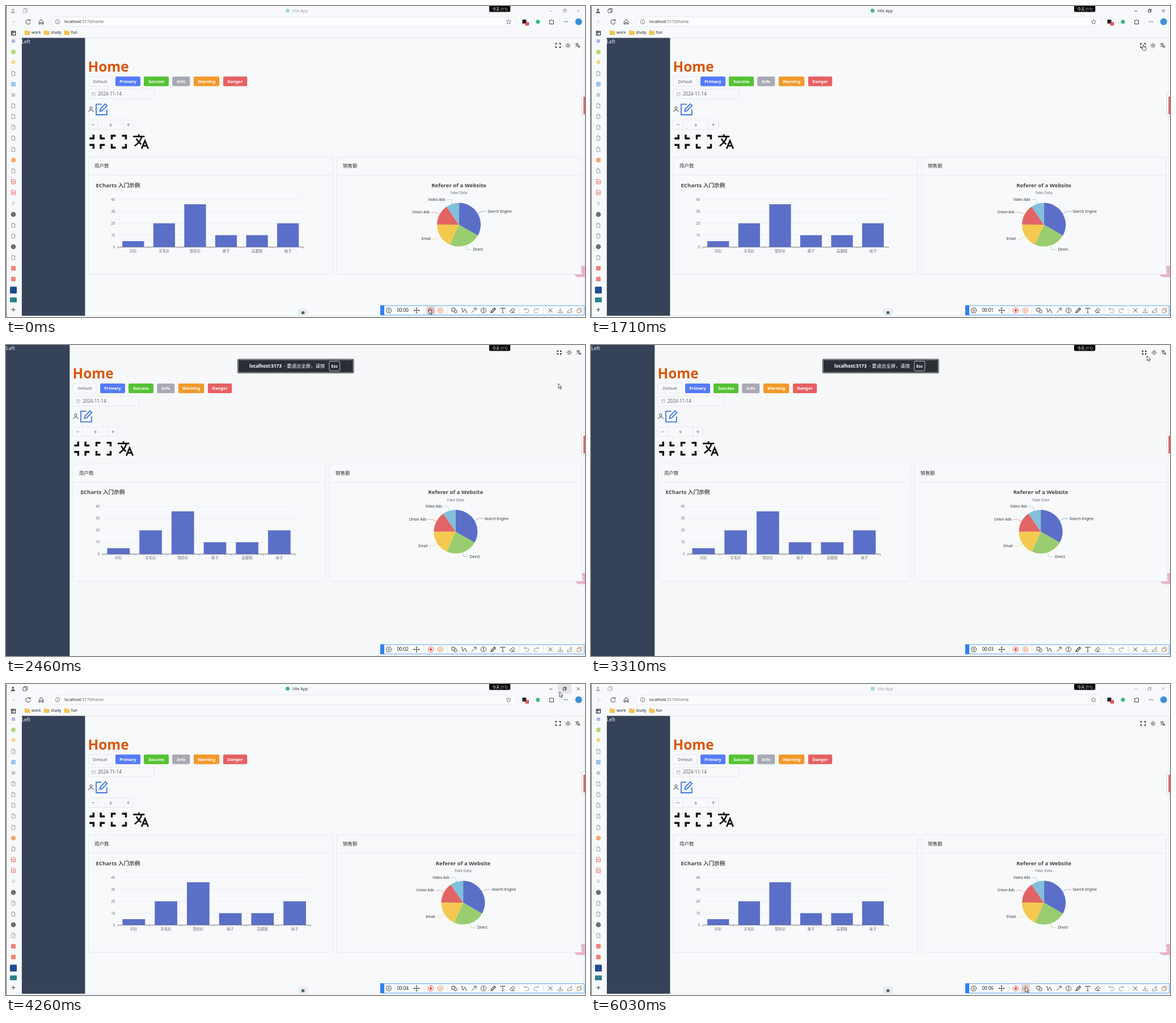
An HTML page that plays this animation: 1021 px wide and 549 px high, repeating every 6.13 s.

```html
<!DOCTYPE html>
<html lang="zh-CN">
<head>
<meta charset="utf-8">
<title>Vite App</title>
<style>
html, body { margin: 0; width: 100%; height: 100%; overflow: hidden; background: #f7f9fb; }
svg { display: block; width: 1021px; height: 549px; font-family: "Noto Sans", "Open Sans", "Noto Sans CJK SC", "Noto Sans CJK", sans-serif; }
text { white-space: pre; }
</style>
</head>
<body>
<svg id="stage" viewBox="0 0 1021 549"></svg>
<script>
const LOOP = 6130;
const $ = id => document.getElementById(id);

// Markup helpers
const rect = (x, y, w, h, fill, more = '') => `<rect x="${x}" y="${y}" width="${w}" height="${h}" fill="${fill}" ${more}/>`;
const circle = (x, y, r, fill, more = '') => `<circle cx="${x}" cy="${y}" r="${r}" fill="${fill}" ${more}/>`;
const line = (d, color, w = 0.8, more = '') => `<path d="${d}" fill="none" stroke="${color}" stroke-width="${w}" ${more}/>`;
const text = (x, y, size, str, fill, more = '') => `<text x="${x}" y="${y}" font-size="${size}" fill="${fill}" ${more}>${str}</text>`;
const at = (x, y, body, s = 1) => `<g transform="translate(${x} ${y}) scale(${s})">${body}</g>`;
const group = (id, body) => `<g id="${id}">${body}</g>`;
const MID = 'text-anchor="middle"', END = 'text-anchor="end"', BOLD = 'font-weight="700"', SEMI = 'font-weight="600"';

// Icons centred on the origin
const EXPAND = 'M-12.5 -4V-10.5H-5.5M5.5 -10.5H12.5V-4M12.5 4V10.5H5.5M-5.5 10.5H-12.5V4';
const SHRINK = 'M-13.5 -5.7H-6.4V-12.5M6.4 -12.5V-5.7H13.5M13.5 5.7H6.4V12.5M-6.4 12.5V5.7H-13.5';
const LANG = 'M-11 -7H5M-3 -10V-7M1.2 -7C0 -2 -4 3 -8.8 6.3M-6.3 -4C-5 -1 -2 2 .5 4M.9 10L5.5 -1.1 10.1 10M2.7 6H8.4';
const SUN = circle(0, 0, 2, 'none', 'stroke="#222" stroke-width=".9"') +
  [...Array(8)].map((_, i) => `<path d="M0 -3.3V-4.7" stroke="#222" stroke-width=".9" transform="rotate(${i * 45})"/>`).join('');
const DOC = line('M-2.8 -3.8H.8L2.8 -1.8V3.8H-2.8ZM.8 -3.8V-1.8H2.8', '#777', 0.7);

function sideRail() {
  const dot = (y, c, r = 4) => circle(13, y, r, c);
  const box = (y, c, s = 8) => rect(13 - s / 2, y - s / 2, s, s, c, 'rx="1"');
  const docs = [119, 176, 195, 214, 233, 253, 291, 387, 406, 444].map(y => at(13, y, DOC)).join('');
  return docs + line('M9.5 44.5H16.5V51.5H9.5ZM9.5 46.5H16.5M12 44.5V51.5', '#222', 1.1) +
    box(62, '#a9b4f0', 6) + dot(81, '#b9d67c') + dot(99, '#f3d98a', 3.5) + box(138, '#9cc6ee') +
    dot(157, '#c9c9c9', 3.5) + dot(272, '#f2ab70', 4.3) +
    [310, 329].map(y => at(13, y, line('M-3.5 -4H2L3.5 -2.5V4H-3.5ZM-3.5 -.5H3.5M-2 1.8H2', '#e46a62', 0.9))).join('') +
    line('M10.5 346H15.5M10.5 348.2H15.5M10.5 350.4H15.5', '#aaa') +
    dot(368, '#6b6f75', 4.4) + dot(425, '#6b6f75', 4.4) + box(463, '#ee8478') + box(482, '#ee8478') +
    box(501.5, '#1f4b8f', 12) + rect(7, 514.5, 12, 8.5, '#2a8288') + line('M9.5 536H16.5M13 532.5V539.5', '#222', 0.9);
}

function chrome() {
  const folder = (x, name) => `<path d="M${x} 43.5H${x + 3.3}L${x + 4.4} 44.7H${x + 8.6}V50.4H${x}Z" fill="#f6c644" stroke="#d9a12a" stroke-width=".5"/>` +
    text(x + 11.8, 49.2, 7, name, '#222');
  const title = circle(12.3, 6.8, 2, '#8a5a48') + '<path d="M8.5 12.4C8.7 8.6 15.9 8.6 16.1 12.4Z" fill="#4a4a52"/>' +
    line('M30 6H35.5V12H30ZM32 6V4.5H37.5V10.5H35.5', '#333') + circle(496.5, 8.3, 3.5, '#41b883') +
    text(505, 11, 7, 'Vite App', '#333') +
    line('M958 9H963.5M982.5 7H986.5V11H982.5ZM984 7V5.6H988V9.6H986.5M1006.7 6L1011.7 11M1011.7 6L1006.7 11', '#222');
  return rect(0, 0, 1021, 549, '#f7f9fc') +
    rect(27.5, 56, 991.7, 491, '#f7f9fb', 'stroke="#dfe4e8" stroke-width=".7" rx="2"') +
    `<rect id="maxHover" x="973" y="0" width="24" height="17" fill="#e2e4e7"/>` + group('title', title) +
    line('M19 28H11.5M14.7 24.8L11.5 28L14.7 31.2', '#c9ccd0') +
    line('M42.2 25.6A4 4 0 1 0 43 28.6M42.7 23.6V26H40.2', '#222', 0.9) +
    line('M58.3 27.3L62 24L65.7 27.3V32H63.5V29H60.5V32H58.3Z', '#222', 0.9) +
    rect(78, 19.2, 822, 17, '#fbfcfd', 'rx="8.5" stroke="#e1e5e9" stroke-width=".8"') +
    circle(91, 27.8, 3.9, 'none', 'stroke="#555" stroke-width=".7"') + line('M91 27V30M91 25.3V26.1', '#555') +
    text(103, 30.4, 7, 'localhost<tspan fill="#666">:5173/home</tspan>', '#222') +
    line('M886.3 23.7L887.5 26.4 890.4 26.7 888.2 28.7 888.9 31.6 886.3 30.1 883.7 31.6 884.4 28.7 882.2 26.7 885.1 26.4Z', '#555', 0.7) +
    rect(910.5, 24, 7, 7, '#20242a', 'rx="1"') + rect(915.7, 28.2, 6.3, 6.3, '#d9363e', 'rx="1"') + text(918.9, 33.4, 5, '2', '#fff', MID) +
    circle(938, 27.8, 3.6, '#41b883') +
    line('M958.5 25.5H960.5A1.6 1.6 0 0 1 963.5 25.5H965.5V31.8H958.5V30A1.5 1.5 0 0 0 958.5 27.2Z', '#222', 0.9) +
    line('M976.5 23V32.5', '#dde1e5') + [984.5, 987.3, 990.1].map(x => circle(x, 27.8, 0.75, '#222')).join('') +
    circle(1009.8, 27.8, 6, '#3b8fd8') +
    folder(33.3, 'work') + folder(67.5, 'study') + folder(103, 'fun') + sideRail() +
    rect(515, 533.5, 17.5, 13.5, '#e9ebee', 'rx="6"') + circle(523.7, 541.5, 2.8, '#4a6a66');
}

function form() {
  const button = (x, w, name, fill, ink = '#fff', more = SEMI) => rect(x, 124.5, w, 17, fill, `rx="2" ${ink === '#fff' ? '' : 'stroke="#dcdfe6" stroke-width=".6"'}`) +
    text(x + w / 2, 135.8, 7.4, name, ink, `${MID} ${more}`);
  const FIELD = 'rx="2" stroke="#dfe2e8" stroke-width=".7"';
  return text(27.5, 65.6, 8.5, 'Left', '#f0f2f5') + text(144.5, 115.6, 24.4, 'Home', '#d9570b', BOLD) +
    button(145, 42, 'Default', '#f8f9fb', '#606266', '') + button(193, 44, 'Primary', '#557bfa') +
    button(243, 44, 'Success', '#55c234') + button(293.3, 31, 'Info', '#a7aab3') +
    button(331, 45.3, 'Warning', '#f3992a') + button(383, 42.3, 'Danger', '#e56062') +
    rect(145, 147.2, 116.5, 16.6, '#f8f9fb', FIELD) +
    line('M151.3 153H157V158.5H151.3ZM151.3 155H157M152.8 152V153.5M155.6 152V153.5', '#a9adb5', 0.7) +
    text(162, 158.3, 8, '2024-11-14', '#606266') +
    circle(149.9, 180, 2.1, 'none', 'stroke="#333" stroke-width=".9"') + line('M146.1 187V185.7A2.6 2.6 0 0 1 148.7 183.6H151.1A2.6 2.6 0 0 1 153.7 185.7V187', '#333', 0.9) +
    line('M168.5 173.3H159V192H177.8V182.5M165.5 186L166.3 181.8L175.2 172.7L178.3 175.8L169.5 184.9Z', '#3f76dc', 1.8) +
    rect(145, 201.2, 79.8, 16.6, '#f8f9fb', FIELD) + line('M162 201.5V217.5M207.4 201.5V217.5', '#dfe2e8', 0.7) +
    line('M150.6 209.6H156.2M212.8 209.6H218.4M215.6 206.8V212.4', '#666', 0.7) + text(184.5, 212.5, 7.6, '9', '#606266', MID) +
    at(160.7, 239.5, line(SHRINK, '#111', 3.4)) + at(199, 239.5, line(EXPAND, '#111', 3.4)) + at(238, 239.2, line(LANG, '#111', 2.1), 1.27);
}

function pie() {
  const slices = [['Search Engine', 1048, '#5b6fc8'], ['Direct', 735, '#9acc70'], ['Email', 580, '#f3c950'], ['Union Ads', 484, '#e26465'], ['Video Ads', 300, '#82bfdc']];
  const R = 38.5;
  const polar = (a, r) => [r * Math.sin(a), -r * Math.cos(a)];
  let from = 0;
  return text(0, -66.4, 9.6, 'Referer of a Website', '#464646', `${MID} ${BOLD}`) + text(0, -54, 6.4, 'Fake Data', '#6e7079', MID) +
    slices.map(([name, value, color]) => {
      const to = from + value / 3147 * Math.PI * 2, mid = (from + to) / 2;
      const [x, y] = polar(mid, R + 8), side = x > 0 ? 1 : -1;
      const out = `<path d="M0 0L${polar(from, R)}A${R} ${R} 0 0 1 ${polar(to, R)}Z" fill="${color}"/>` +
        line(`M${polar(mid, R)}L${x} ${y}h${side * 8}`, color, 0.6) +
        text(x + side * 10.4, y + 2.2, 6.4, name, '#333', side < 0 ? END : '');
      from = to;
      return out;
    }).join('');
}

// k = 0 narrow layout, 1 wide layout
function bars(k) {
  const left = 197, right = 524.5 + 13 * k, step = (right - left) / 6, base = 425.6;
  let out = '';
  for (let v = 0; v <= 40; v += 10) {
    const y = base - v * 2.1;
    out += text(192.5, y + 2.2, 6.4, v, '#6e7079', END) + line(`M${left} ${y}H${right}`, v ? '#e2e7f0' : '#6e7079', 0.6);
  }
  const data = [['衬衫', 5], ['羊毛衫', 20], ['雪纺衫', 36], ['裤子', 10], ['高跟鞋', 10], ['袜子', 20]];
  data.forEach(([name, v], i) => {
    const x = left + i * step;
    out += rect(x + step * 0.15, base - v * 2.1, step * 0.7, v * 2.1, '#5b6fc8') +
      line(`M${x} ${base}v2.6`, '#6e7079', 0.6) + text(x + step / 2, 434.6, 6.4, name, '#6e7079', MID);
  });
  return out + line(`M${right} ${base}v2.6M${left} ${base}H${right}`, '#6e7079', 0.6);
}

function card(id, x, name) {
  const box = `x="${x}" y="266.3" width="431" height="207.2" rx="2"`;
  return `<rect id="${id}Glow" ${box} fill="none" stroke="#8d96a3" stroke-width="2.4"/>` +
    `<rect id="${id}Box" ${box} fill="#f7f9fb" stroke="#e4e7ec" stroke-width=".8"/>` +
    `<path id="${id}Rule" stroke="#e4e7ec" stroke-width=".8"/>` + text(x + 11, 285.3, 8.5, name, '#303133');
}

function tooltip() {
  return rect(778.6, 354.5, 81, 31.3, '#f8f8fc', 'rx="2" fill-opacity=".87" stroke="#e26465" stroke-width=".7"') +
    text(784, 366.4, 7.5, 'Access From', '#666') + circle(786.8, 376.6, 2.7, '#e26465') +
    text(792.3, 379.3, 7.5, 'Union Ads', '#666') + text(854, 379.3, 7.5, '484', '#666', `${END} ${BOLD}`);
}

function recorder() {
  const ink = '#333', ic = (x, d, c = ink, w = 0.9) => at(x, 537.4, line(d, c, w));
  return rect(660.3, 529, 359.2, 16.4, '#fcfdfe', 'stroke="#4b9bf5" stroke-width=".9"') + rect(660, 528.6, 7, 17.2, '#2f80f5', 'rx="1"') +
    `<rect id="barHover" y="529.5" width="16" height="15.5" fill="#dcdde0"/>` +
    ic(675, 'M-2.5 -4.3H2.5L5 0L2.5 4.3H-2.5L-5 0Z') + at(675, 537.4, circle(0, 0, 1.7, 'none', 'stroke="#333" stroke-width=".8"')) +
    `<text id="clock" x="689.5" y="540.3" font-size="8" fill="#222"></text>` +
    ic(724, 'M-5 0H5M0 -5V5M-3.5 -1.5L-5 0L-3.5 1.5M3.5 -1.5L5 0L3.5 1.5M-1.5 -3.5L0 -5L1.5 -3.5M-1.5 3.5L0 5L1.5 3.5') +
    line('M737 531.5V543.5M777.5 531.5V543.5M905 531.5V543.5M947.5 531.5V543.5', '#d5d8dc') +
    circle(749, 537.4, 4.6, 'none', 'stroke="#e5483f"') + rect(747.1, 535.5, 3.8, 3.8, '#e5332a') +
    circle(766, 537.4, 4.6, 'none', 'stroke="#f07a3c"') + line('M764.7 535.4V539.4M767.3 535.4V539.4', '#ee6a28', 1.1) +
    ic(790.5, 'M-4.5 -4H1V1.5H-4.5ZM2 -1.5A3 3 0 1 1 -1 2.5') + ic(808, 'M-4 -3.5L-2.5 3.5L1.5 -2.5L4 3.5M-5 -3.5H-3M3 3.5H5') +
    ic(825, 'M-4 4L4 -4M-.5 -4H4V.5') + ic(842, 'M4.5 0A4.5 4.5 0 1 1 -4.5 0A4.5 4.5 0 1 1 4.5 0M-1 -1.5L.3 -2.5V2.5') +
    ic(859, 'M-4 4L-3 1L2.5 -4.2L4.2 -2.5L-1 3Z', ink, 1.2) + ic(876, 'M-4 -2.5V-4H4V-2.5M0 -4V4.3M-1.5 4.3H1.5') +
    ic(893, 'M-4.5 1.2L1 -4L4.3 -.8L-.8 4H-2ZM-1.8 -1.3L1.5 2M-.5 4H4') +
    ic(918, 'M-2 -4.5L-4.3 -2.3L-2 0M-4.3 -2.3H1A3 3 0 0 1 1 4H-2.5', '#8a8d91') + ic(935, 'M2 -4.5L4.3 -2.3L2 0M4.3 -2.3H-1A3 3 0 0 0 -1 4H2.5', '#8a8d91') +
    ic(960, 'M-3.7 -3.7L3.7 3.7M3.7 -3.7L-3.7 3.7') + ic(977.3, 'M0 -4.5V2M-2.3 -.3L0 2L2.3 -.3M-4 1.5V4.2H4V1.5', '#777') +
    ic(994, 'M0 -1L3.5 -4L2.5 .5L4 2.5L-1 4.3H-4V1.5L-1.5 0Z', '#777') + ic(1011, 'M-4 -1.7H2V4.2H-4ZM-2 -1.7V-4H4V2H2', '#a98468');
}

$('stage').innerHTML =
  rect(0, 0, 1021, 549, '#f7f8fa') + group('chrome', chrome()) + '<rect id="side" fill="#354258"/>' +
  group('form', form()) +
  group('tools', at(973.5, 69.7, `<path id="fsIcon" fill="none" stroke="#111" stroke-width="3.8"/>`, 0.33) +
    at(991, 69.7, SUN) + at(1008, 69.7, line(LANG, '#222', 2.1), 0.4) +
    '<path d="M1021 459H1010A9.7 9.7 0 0 0 1010 478.4H1021Z" fill="#ecaecb" stroke="#e3d3dc" stroke-width="1"/>' +
    line('M1007.5 465H1011.5V469H1007.5ZM1011 473.5L1013.5 467.5L1016 473.5M1012 471.8H1015M1008 471V473H1010M1013.5 465H1016V466.5', '#fff', 1)) +
  group('left', card('users', 145, '用户数') + text(158.5, 319.6, 9.6, 'ECharts 入门示例', '#464646', BOLD) + group('bars', '')) +
  group('right', card('sales', 583, '销售额') + group('pie', pie()) + group('tip', tooltip())) +
  rect(1015.5, 155, 8, 40, '#fff', 'rx="3" stroke="#d3d6da" stroke-width="1"') + rect(1018.2, 160, 4, 31.5, '#e0646a', 'rx="1"') +
  group('notice', rect(408, 24.6, 205.6, 25.4, '#2a2e35', 'rx="3"') + rect(409.3, 25.9, 203, 22.8, '#2a2e35', 'rx="2" stroke="#e8eaed" stroke-width=".8"') +
    text(429, 40.3, 8, 'localhost:5173', '#fff', BOLD) + text(490.5, 40.3, 8.4, '- 要退出全屏，请按', '#fff') +
    rect(570, 28.6, 18.8, 17.2, 'none', 'rx="2" stroke="#e8eaed" stroke-width=".8"') + text(579.4, 40.2, 7.6, 'Esc', '#fff', `${MID} ${BOLD}`)) +
  '<path d="M852 0H889.3V8.5Q889.3 10.6 887 10.6H854.3Q852 10.6 852 8.5Z" fill="#050505"/>' + text(870.7, 7.7, 6.6, '今天 (11)', '#fff', MID) +
  rect(0, 0, 0.8, 549, '#3a3d42') + recorder() +
  `<g id="cursor"><path id="arrow" d="M0 0V8.6L2 6.8L3.5 10L4.9 9.4L3.5 6.3H6.1Z" fill="#fff" stroke="#111" stroke-width=".7"/>` +
  `<path id="hand" d="M-.9 5.8V.9Q0 -.5 .9 .9V4L4.6 4.9Q5.3 5.2 5.1 6.2L4.3 10.3H-.6L-3.1 6.8Q-2.4 5.6 -.9 6.8Z" fill="#fff" stroke="#111" stroke-width=".7"/></g>`;

// Pointer path: time, x, y
const PATH = [
  [0, 746, 535], [40, 746, 535], [120, 772, 498], [300, 900, 350], [440, 1001, 214], [560, 1009, 140], [640, 998, 112],
  [730, 998, 112], [900, 985, 92], [1250, 974, 68], [2830, 974, 68], [3000, 976, 50], [3200, 982, 32], [3310, 980.5, 19],
  [3410, 980, 17.5], [3510, 980, 17.5], [3640, 976, 14], [4440, 976, 14], [4560, 877, 204], [4680, 795, 345],
  [4740, 772, 372], [4900, 690.5, 528], [5040, 745, 533], [5370, 745, 533], [5560, 749, 535], [5790, 766, 535], [LOOP, 766, 535]
];
const TICKS = [1000, 2020, 3030, 4050, 5040, 5990];

const ramp = (t, a, b) => Math.min(1, Math.max(0, (t - a) / (b - a)));
const easeOut = p => 1 - (1 - p) ** 3;
const show = (id, on) => $(id).style.display = on ? '' : 'none';
const move = (id, x, y) => $(id).setAttribute('transform', `translate(${x} ${y})`);
const set = (id, attrs) => { for (const k in attrs) $(id).setAttribute(k, attrs[k]); };

function pointer(t) {
  const i = Math.max(1, PATH.findIndex(p => p[0] >= t));
  const [t0, x0, y0] = PATH[i - 1], [t1, x1, y1] = PATH[i], p = ramp(t, t0, t1);
  return [x0 + (x1 - x0) * p, y0 + (y1 - y0) * p];
}

function layout(full) {
  const dy = full ? -56.4 : 0, w = full ? 445.7 : 431;
  show('chrome', !full);
  set('side', full ? { x: 0, y: 0, width: 112.3, height: 549 } : { x: 28, y: 56.3, width: 111.4, height: 490.5 });
  set('fsIcon', { d: full ? SHRINK : EXPAND });
  move('form', full ? -27 : 0, dy);
  move('left', full ? -27 : 0, dy);
  move('right', full ? -13 : 0, dy);
  move('tools', full ? 2 : 0, dy);
  for (const [id, x] of [['users', 145], ['sales', 583]]) {
    set(id + 'Box', { width: w });
    set(id + 'Glow', { width: w });
    set(id + 'Rule', { d: `M${x} 298.5h${w}` });
  }
}

let lastFull, lastK;
function draw(t) {
  const full = t >= 1940 && t < 4260;
  if (full !== lastFull) layout(lastFull = full);

  const k = t < 4260 ? easeOut(ramp(t, 2240, 2540)) : 1 - easeOut(ramp(t, 4440, 4700));
  if (k !== lastK) {
    lastK = k;
    $('bars').innerHTML = bars(k);
    move('pie', 798.6 + 7.5 * k, 386);
  }

  $('title').style.opacity = t >= 1710 && t < 5990 ? 1 : 0.45;
  show('maxHover', t >= 4260 && t < 4440);
  show('notice', full);
  $('notice').style.opacity = ramp(t, 1920, 2120);

  $('usersGlow').style.opacity = 0;
  $('salesGlow').style.opacity = 0.35 * (ramp(t, 140, 300) - ramp(t, 420, 640) + ramp(t, 4600, 4720) - ramp(t, 4880, 5040));

  $('tip').style.opacity = ramp(t, 4660, 4720) - ramp(t, 4920, 5040);
  const slide = 1 - easeOut(ramp(t, 4680, 4860));
  move('tip', 22 * slide, -20 * slide);

  $('clock').textContent = '00:0' + TICKS.filter(s => t >= s).length;
  const [x, y] = pointer(t), onBar = y > 529 && x > 741 && x < 774.5;
  show('barHover', onBar);
  if (onBar) set('barHover', { x: x < 757.5 ? 741 : 758.5 });
  move('cursor', x, y);
  const hand = (t >= 1080 && t < 1940) || (t >= 3570 && t < 4260);
  show('hand', hand);
  show('arrow', !hand);
}

const start = performance.now();
function frame() {
  draw((performance.now() - start) % LOOP);
  requestAnimationFrame(frame);
}
frame();
</script>
</body>
</html>
```
